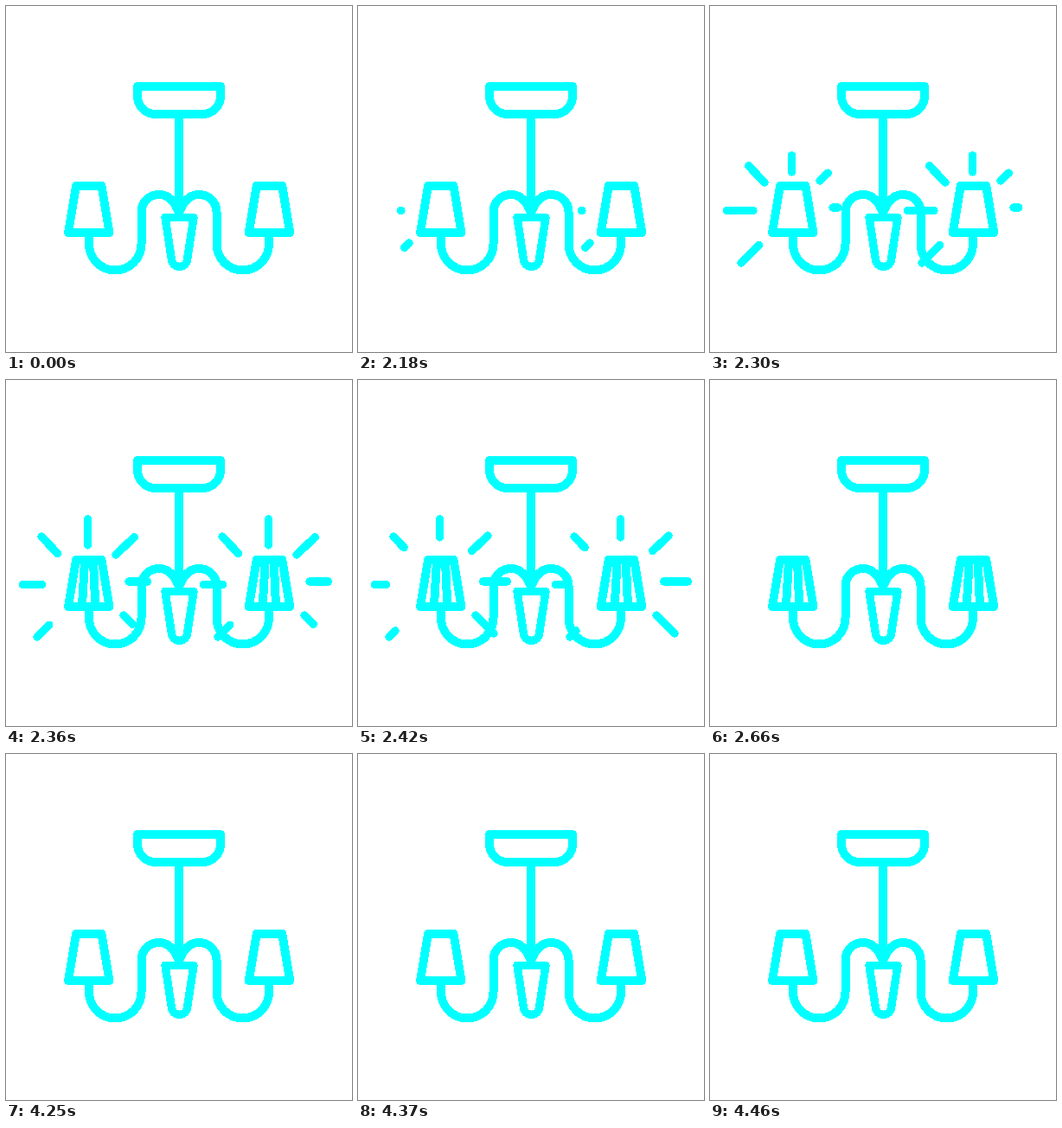
These frames come from a looping animation (400 px wide and 400 px high, 4.49 s). An HTML page:

```html
<!DOCTYPE html>
<html lang="en">
<head>
<meta charset="utf-8">
<title>Chandelier</title>
<style>
  html, body { margin: 0; width: 100%; height: 100%; overflow: hidden; background: #fff; }
  svg {
    display: block; width: 100vw; height: 100vh;
    fill: none; stroke: #0ff; stroke-width: 10;
    stroke-linecap: round; stroke-linejoin: round;
    shape-rendering: crispEdges;
  }
  .drop { stroke-width: 9.4; }
  .rays { stroke-width: 9.4; }
</style>
</head>
<body>
<svg viewBox="0 0 400 400">
  <defs>
    <path id="arm" d="M96 262V275A30.25 30.5 0 0 0 156.5 275V238A20.5 20 0 0 1 177 218C188 218 196 227 201 242"/>
    <path id="shade" d="M81 208H110.5L119.5 262H72Z"/>
    <path id="pleats" d="M91 209L88 261M101 209L103.3 261"/>
    <g id="rays"></g>
  </defs>
  <path d="M152 93H248V104A21 21 0 0 1 227 125H173A21 21 0 0 1 152 104Z"/>
  <path d="M200 125V238"/>
  <use href="#arm"/>
  <use href="#arm" transform="matrix(-1 0 0 1 400 0)"/>
  <path class="drop" d="M184 244.5H217L209.5 293.5A9.1 9.1 0 0 1 191.5 293.5Z"/>
  <use href="#shade"/>
  <use href="#shade" x="208.7"/>
  <g class="pleats">
    <use href="#pleats"/>
    <use href="#pleats" x="208.7"/>
  </g>
  <g class="rays">
    <use href="#rays"/>
    <use href="#rays" x="209"/>
  </g>
</svg>
<script>
  const LOOP = 4490, STEP = 30, BURST = 2180;
  const STAGGER = 25;
  const TIP = { start: 2153, length: 116 };
  const TAIL = { start: 2278, length: 205 };
  const TOGGLES = [2360, 4250, 4310, 4370, 4430, 4460];

  // Inner end, then outer end, clockwise from lower left
  const RAYS = [
    [59, 274, 36, 297],
    [50, 236.5, 19.5, 236.5],
    [63, 204, 41, 181],
    [94.5, 192, 94.5, 161],
    [127, 202, 150, 180],
    [142, 233, 172.5, 233],
    [136, 272, 157, 293]
  ];

  const pleats = document.querySelector('.pleats');
  const group = document.getElementById('rays');
  const lines = RAYS.map(() =>
    group.appendChild(document.createElementNS('http://www.w3.org/2000/svg', 'line')));

  const progress = (time, edge) => (time - edge.start) / edge.length;
  const clamp = v => Math.min(1, Math.max(0, v));

  function drawRay(line, [x1, y1, x2, y2], time) {
    const tip = progress(time, TIP), tail = progress(time, TAIL);
    const place = (end, v) => {
      line.setAttribute('x' + end, x1 + (x2 - x1) * clamp(v));
      line.setAttribute('y' + end, y1 + (y2 - y1) * clamp(v));
    };
    place(1, tail);
    place(2, tip);
    line.setAttribute('visibility', tip > 0 && tail < 1 ? 'visible' : 'hidden');
  }

  function draw(now) {
    const t = now % LOOP;
    const stepped = BURST + Math.floor((t - BURST) / STEP) * STEP;
    lines.forEach((line, i) => drawRay(line, RAYS[i], stepped - i * STAGGER));
    const lit = TOGGLES.filter(at => t >= at).length % 2;
    pleats.setAttribute('visibility', lit ? 'visible' : 'hidden');
  }

  const origin = performance.now();
  function tick() {
    draw(performance.now() - origin);
    requestAnimationFrame(tick);
  }
  tick();
</script>
</body>
</html>
```
